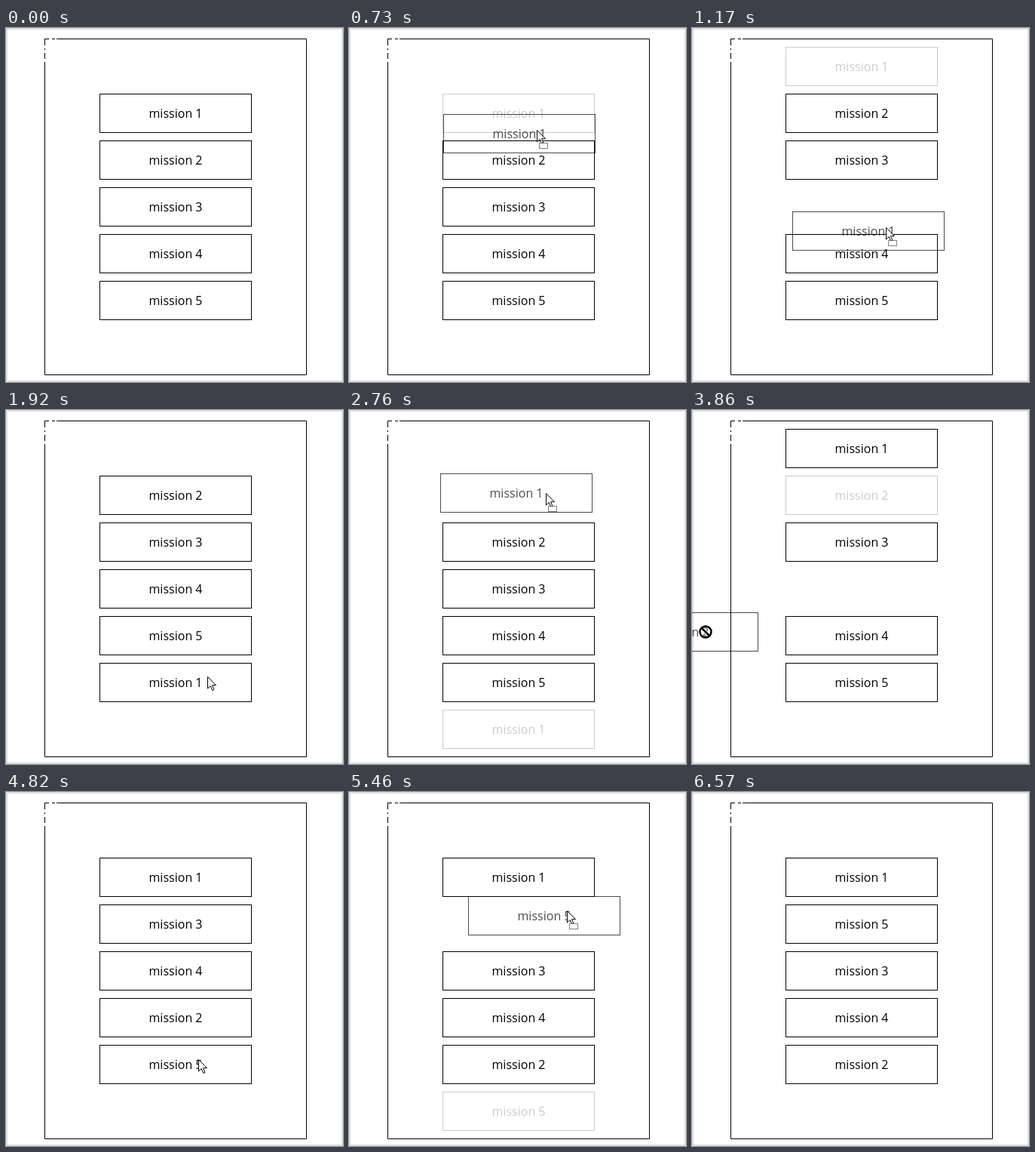
Write an HTML page that moves like this. It is 447 px wide and 469 px high and loops after 7 s.

```html
<!DOCTYPE html>
<html lang="en">
<head>
<meta charset="utf-8">
<title>Drag to sort</title>
<style>
  html, body { margin: 0; width: 100%; height: 100%; overflow: hidden; background: #fff; }
  svg { display: block; }
  text { font: 16px "Open Sans", "Noto Sans", sans-serif; text-anchor: middle; }
  .box { fill: none; stroke: #000; }
</style>
</head>
<body>
<svg id="stage" width="447" height="469">
  <rect x="1" y="1" width="445" height="467" fill="none" stroke="#d2d2d2" stroke-width="1.5"/>
  <path class="box" d="M51.5 14V23M51.5 27V29M51.5 33V41M51.5 45V459.5H398.5V14.5H67M51 14.5H57M61 14.5H65"/>
  <g id="list"></g>
  <g id="pointer">
    <g id="arrow">
      <path d="M.5 .5V16L4.2 12.6L6.8 18.5L9 17.5L6.5 11.7H11.5Z" fill="#fff" stroke="#000"/>
      <rect id="badge" x="3.5" y="17.5" width="11" height="7" fill="#fff" stroke="#000" stroke-dasharray="1 1"/>
    </g>
    <g id="denied" fill="none">
      <path d="M-5 -5L5 5M8 0A8 8 0 1 1 -8 0A8 8 0 1 1 8 0" stroke="#fff" stroke-width="4"/>
      <path d="M-5 -5L5 5M7.5 0A7.5 7.5 0 1 1 -7.5 0A7.5 7.5 0 1 1 7.5 0" stroke="#000" stroke-width="2.5"/>
    </g>
  </g>
</svg>
<script>
const LOOP = 7000, LEFT = 124, TOP = 87, PITCH = 62;
const $ = id => document.getElementById(id);

// Pointer path: time, x, y
const path = [
  [50, 225, 358], [200, 240, 250], [380, 248, 120], [560, 248, 108],
  [730, 249, 135], [1170, 257, 264], [1460, 266, 353], [1720, 266, 353],
  [1920, 267, 353], [2050, 267, 353], [2090, 264, 361], [2210, 256, 318], [2400, 253, 246],
  [2760, 261, 110], [2860, 258, 93], [2920, 258, 94], [3150, 256, 175], [3240, 256, 175],
  [3400, 235, 232], [3550, 120, 270], [3670, 30, 286], [3860, 18, 294], [3900, 18, 294],
  [4100, 130, 300], [4250, 226, 298], [4430, 226, 298], [4760, 255, 354], [4950, 255, 354],
  [5110, 400, 300], [5200, 425, 250], [5300, 400, 200], [5420, 300, 156], [5560, 262, 158],
  [5800, 262, 158], [6060, 420, 200]
];

// Each drag: first slot, times, grab point, and [time, slot] for each slot entered
const drags = [
  { from: 0, start: 560, end: 1720, grab: [248, 108], over: [[780, 1], [990, 2], [1225, 3], [1405, 4]] },
  { from: 4, start: 2090, end: 2890, grab: [264, 361], over: [[2190, 3], [2356, 2], [2520, 1], [2684, 0]] },
  { from: 1, start: 3240, end: 4430, grab: [256, 175], over: [[3345, 2], [4090, 3]] },
  { from: 4, start: 4950, end: 5800, grab: [255, 354], over: [[5390, 1]] }
];

function makeBox(label) {
  const g = document.createElementNS("http://www.w3.org/2000/svg", "g");
  g.innerHTML = `<rect class="box" x=".5" y=".5" width="201" height="51"/><text x="101" y="32">${label}</text>`;
  $("list").append(g);
  return g;
}
const boxes = [1, 2, 3, 4, 5].map(n => makeBox("mission " + n));
const ghost = makeBox("");
ghost.setAttribute("opacity", .7);

const place = (el, x, y) => el.setAttribute("transform", `translate(${Math.round(x)} ${Math.round(y)})`);
const show = (el, on) => el.setAttribute("visibility", on ? "visible" : "hidden");
const slotY = i => TOP + PITCH * i;

function pointerAt(t) {
  const i = path.findIndex(p => p[0] > t);
  if (i < 1) return null;
  const [t0, x0, y0] = path[i - 1], [t1, x1, y1] = path[i];
  const k = (t - t0) / (t1 - t0);
  return [x0 + (x1 - x0) * k, y0 + (y1 - y0) * k];
}

function draw(t) {
  const order = [0, 1, 2, 3, 4];
  let drag = null, gap = -1;
  for (const d of drags) {
    if (t >= d.end) order.splice(d.over.at(-1)[1], 0, order.splice(d.from, 1)[0]);
    else if (t >= d.start) {
      drag = d;
      for (const [time, slot] of d.over) if (t >= time) gap = slot;
    }
  }

  // Open the gap by pushing one side of the list away
  order.forEach((item, i) => {
    let shift = 0;
    if (gap >= 0) {
      if (gap > drag.from && i <= gap) shift = -PITCH;
      if (gap < drag.from && i >= gap) shift = PITCH;
    }
    place(boxes[item], LEFT, slotY(i) + shift);
    boxes[item].setAttribute("opacity", drag && i === drag.from ? .2 : 1);
  });

  const pos = pointerAt(t);
  show(ghost, drag);
  $("pointer").style.display = pos ? "" : "none";
  if (!pos) return;
  const [x, y] = pos;
  place($("pointer"), x, y);
  const outside = drag && (x < 51 || x > 398);
  show($("arrow"), !outside);
  show($("badge"), drag && !outside);
  show($("denied"), outside);
  if (drag) {
    ghost.lastChild.textContent = "mission " + (order[drag.from] + 1);
    place(ghost, LEFT + x - drag.grab[0], slotY(drag.from) + y - drag.grab[1]);
  }
}

const begin = performance.now();
function tick() {
  draw((performance.now() - begin) % LOOP);
  requestAnimationFrame(tick);
}
tick();
</script>
</body>
</html>
```
